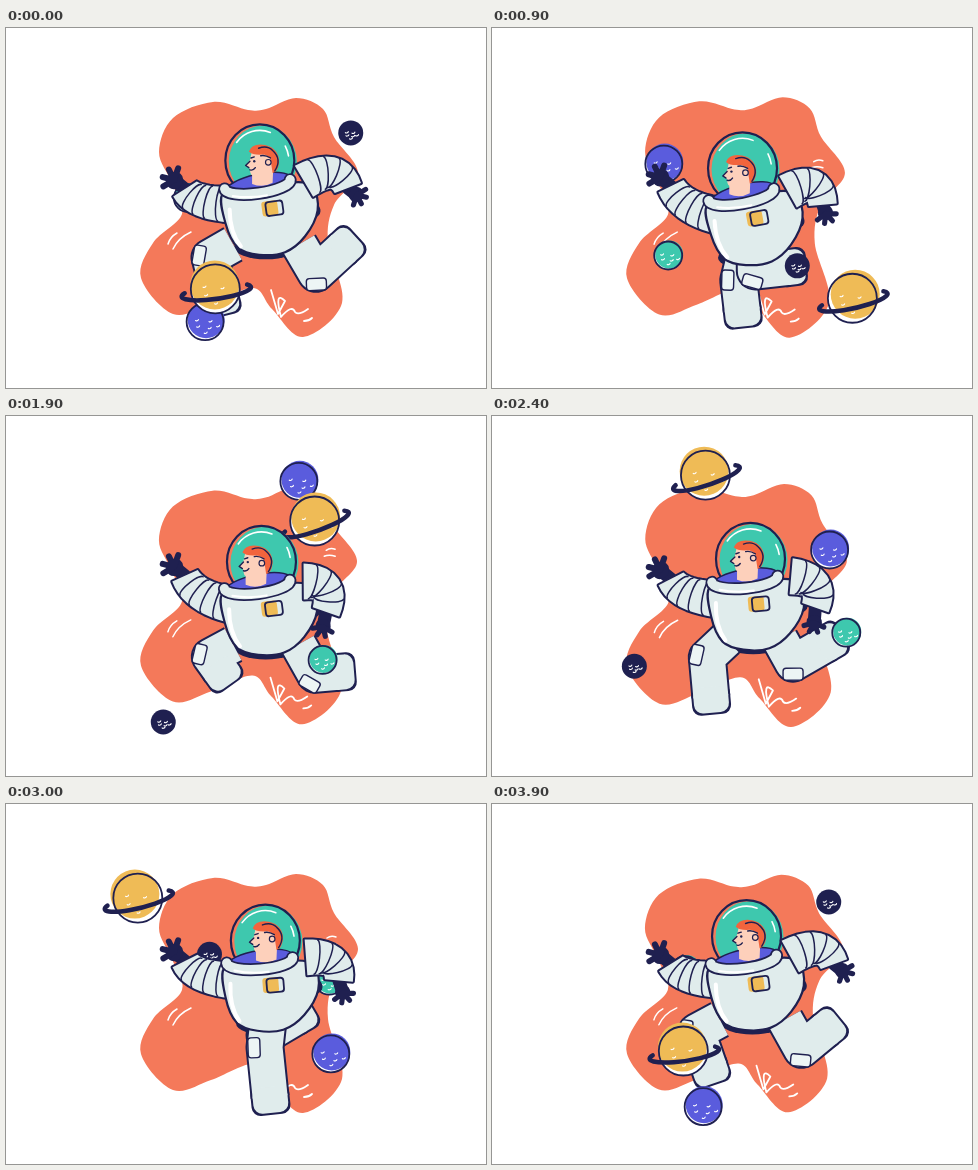
Write an HTML page with a canvas that moves like this. It is 480 px wide and 360 px high and loops after 4 s.

```html
<!DOCTYPE html>
<html>
<head>
<meta charset="utf-8">
<style>
html, body { margin: 0; width: 100%; height: 100%; overflow: hidden; background: #fff; }
canvas { display: block; }
</style>
</head>
<body>
<canvas id="stage" width="480" height="360"></canvas>
<script>
const ctx = document.getElementById('stage').getContext('2d');
const LOOP = 4000, STEP = 100, RAD = Math.PI / 180;
const NAVY = '#1f2050', SUIT = '#e0ecec', WHITE = '#fff', ORANGE = '#f4795a',
  TEAL = '#3ec8ae', BLUE = '#5a5cdd', YELLOW = '#efbb56', SKIN = '#fdd0bb', HAIR = '#f2643d';

let phase = 0; // degrees through the loop

// Every moving value swings around a middle and peaks at a given phase.
const wave = (mid, amp, peak) => mid + amp * Math.cos((phase - peak) * RAD);

// ---- drawing helpers ----

function paint(fill, stroke, width = 2) {
  if (fill) { ctx.fillStyle = fill; ctx.fill(); }
  if (stroke) { ctx.strokeStyle = stroke; ctx.lineWidth = width; ctx.stroke(); }
}

function oval(x, y, rx, ry, fill, stroke, width, tilt = 0, from = 0, to = 2 * Math.PI) {
  ctx.beginPath();
  ctx.ellipse(x, y, rx, ry, tilt, from, to);
  paint(fill, stroke, width);
}

const disc = (x, y, r, ...style) => oval(x, y, r, r, ...style);

function box(x, y, w, h, r, ...style) {
  ctx.beginPath();
  ctx.roundRect(x, y, w, h, r);
  paint(...style);
}

function line(d, color, width = 2) {
  ctx.strokeStyle = color;
  ctx.lineWidth = width;
  ctx.stroke(new Path2D(d));
}

function shape(d, color) {
  ctx.fillStyle = color;
  ctx.fill(new Path2D(d));
}

function local(x, y, turn, fn) {
  ctx.save();
  ctx.translate(x, y);
  ctx.rotate(turn);
  fn();
  ctx.restore();
}

// Closed curve through the given points
function smooth(pts) {
  const n = pts.length, at = i => pts[(i + n) % n];
  ctx.beginPath();
  ctx.moveTo(...pts[0]);
  for (let i = 0; i < n; i++) {
    const [a, b, c, d] = [at(i - 1), at(i), at(i + 1), at(i + 2)];
    ctx.bezierCurveTo(b[0] + (c[0] - a[0]) / 6, b[1] + (c[1] - a[1]) / 6,
      c[0] - (d[0] - b[0]) / 6, c[1] - (d[1] - b[1]) / 6, c[0], c[1]);
  }
}

// ---- planets ----

function craters(r) {
  for (let i = 0; i < 6; i++) {
    const a = i * 2.4 + .6, d = r * (.3 + .08 * i);
    oval(d * Math.cos(a), r * .2 + d * Math.sin(a) * .7, 1.6, 1, null, WHITE, 1.1, -.4, .3, 3);
  }
}

function planet(r, color, dx, dy) {
  disc(0, 0, r, WHITE);
  disc(dx, dy, r, color);
  disc(0, 0, r, null, NAVY, 1.8);
  craters(r);
}

function ringed() {
  planet(24.5, YELLOW, wave(0, 3, 100), -4);
  local(1, 3, wave(-.24, .1, 0), () =>
    oval(0, 0, 35, 7, null, NAVY, 4.5, 0, -.45, Math.PI + .45));
}

function moon() {
  disc(0, 0, 12.5, NAVY);
  craters(9);
}

// x and y each as [middle, amplitude, peak phase]
const planets = [
  { x: [252, 90, 234], y: [184, 128, -31], draw: () => planet(18.5, BLUE, 1, -2) },
  { x: [250, 125, 109], y: [176, 118, 44], draw: ringed },
  { x: [255, 100, 223], y: [205, 45, 141], draw: () => planet(14, TEAL, 1, -1) },
  { x: [247, 107, 24], y: [202, 110, 152], draw: moon }
];

// The upper part of each orbit passes behind the astronaut.
function drawPlanets(behind) {
  for (const { x, y, draw } of planets)
    if (wave(0, 1, y[2]) < -.35 === behind) local(wave(...x), wave(...y), 0, draw);
}

// ---- backdrop ----

const blob = [[290, 70], [260, 81], [242, 82], [207, 74], [167, 90], [153, 124], [166, 155], [176, 186],
  [147, 215], [135, 250], [167, 286], [205, 276], [247, 260], [266, 281], [297, 309], [336, 275],
  [322, 215], [328, 177], [352, 145], [328, 109], [317, 81]];

function drawBlob() {
  const swell = Math.sin(2 * phase * RAD);
  ctx.save();
  ctx.translate(135, 187);
  ctx.scale(1 + .014 * swell, 1 + .018 * swell);
  ctx.translate(-135, -187);
  smooth(blob);
  paint(ORANGE);
  line('M162 216Q164 209 171 205M167 221Q172 210 185 204M321 134Q325 131 330 133M319 140Q324 138 330 140', WHITE, 1.5);
  line('M265 262L272 286L279 273Q268 262 275 289Q286 276 289 284Q292 288 302 281M298 293Q303 293 306 290', WHITE, 1.8);
  ctx.restore();
}

// ---- astronaut ----

// Both legs share one stride, half a loop apart.
function drawLeg(x, y, shift, lift) {
  const stride = (mid, amp, peak) => wave(mid, amp, peak + shift);
  const hip = [x + stride(8, 33, 0), y + 56];
  const knee = [x + stride(5, 53, 0), y + stride(77, 10, -37)];
  const foot = [x + stride(28, 66, 15), y + stride(90, 40, 240) - lift * Math.cos(2 * phase * RAD)];
  const w = 35, turn = Math.atan2(foot[1] - knee[1], foot[0] - knee[0]);
  for (const [grow, color] of [[2, NAVY], [0, SUIT]]) {
    ctx.beginPath();
    ctx.moveTo(...hip);
    ctx.lineTo(...knee);
    ctx.lineTo(foot[0] - 8 * Math.cos(turn), foot[1] - 8 * Math.sin(turn));
    paint(null, color, w + 2 * grow);
    local(...foot, turn, () =>
      box(-18 - grow, -w / 2 - grow, 26 + 2 * grow, w + 2 * grow, 9, color));
  }
  const axis = Math.atan2(foot[1] - hip[1], foot[0] - hip[0]);
  local(knee[0] - 10 * Math.sin(axis), knee[1] + 10 * Math.cos(axis), axis, () =>
    box(-10, -5, 20, 12, 3, '#edf5f5', NAVY, 1.4));
}

function drawHand(x, y, turn, size) {
  local(x, y, turn, () => {
    oval(-1, 0, 8 * size, 9 * size, NAVY);
    ctx.beginPath();
    for (let a = -1.2; a < 1.3; a += .8) {
      ctx.moveTo(0, 0);
      ctx.lineTo(11.5 * size * Math.cos(a), 12.5 * size * Math.sin(a));
    }
    paint(null, NAVY, 6 * size);
  });
}

// Tapered, ribbed sleeve along a curve through the elbow
function drawArm(shoulder, elbow, cuff, hand, handSize) {
  const mid = elbow.map((e, i) => 2 * e - (shoulder[i] + cuff[i]) / 2);
  const at = u => {
    const v = 1 - u;
    const p = mid.map((m, i) => v * v * shoulder[i] + 2 * u * v * m + u * u * cuff[i]);
    const d = mid.map((m, i) => v * (m - shoulder[i]) + u * (cuff[i] - m));
    return { p, turn: Math.atan2(d[1], d[0]), half: 18 - 4 * u };
  };
  const edge = (u, side) => {
    const { p, turn, half } = at(u);
    return [p[0] - side * half * Math.sin(turn), p[1] + side * half * Math.cos(turn)];
  };
  ctx.beginPath();
  ctx.moveTo(...cuff);
  ctx.lineTo(...hand);
  paint(null, NAVY, 13);
  drawHand(...hand, Math.atan2(hand[1] - cuff[1], hand[0] - cuff[0]), handSize);

  ctx.beginPath();
  for (let i = 0; i <= 10; i++) ctx.lineTo(...edge(i / 10, 1));
  for (let i = 10; i >= 0; i--) ctx.lineTo(...edge(i / 10, -1));
  ctx.closePath();
  paint(null, NAVY, 4);
  paint(SUIT);
  for (let u = .2; u < .9; u += .2) {
    const { p, turn, half } = at(u);
    local(...p, turn, () => oval(-3, 0, 4, half, null, NAVY, 1.5, 0, -1.5, 1.5));
  }
}

function drawHead() {
  ctx.scale(1.08, 1.08);
  shape('M-8-13L-10-4L-14 1L-10 4Q-10 9-8 10L-8 18Q2 22 11 17L12-6Q6-16-8-13Z', SKIN);
  shape('M-11-12Q-8-20 4-18Q17-15 17-2Q16 7 11 8L9-5Q6-10-1-9Q-8-9-11-12Z', HAIR);
  line('M-2-15Q6-18 11-13Q20-5 13 6M9-6Q4-9 0-8M-10 5Q-7 6-5 3M-9-6L-6-7M-10-3L-14 1L-11 3', NAVY, 1.3);
  disc(-6, -3, 1.1, NAVY);
  disc(7, -2, 2.6, SKIN, NAVY, 1.1);
}

const torso = [[-35, 0], [-37, 30], [-28, 56], [-8, 66], [18, 67], [40, 54], [56, 30], [54, 6], [33, -1], [0, 6]];

function drawTorso() {
  smooth(torso);
  paint(SUIT, NAVY, 2.2);
  line('M-31 17Q-34 40-25 55', WHITE, 4);
  oval(0, -4, 33, 9, null, NAVY, 13, 0, 0, Math.PI);
  oval(0, -4, 33, 9, null, SUIT, 9.5, 0, 0, Math.PI);
  line('M-26 4Q-10 9 8 8', WHITE, 2);
  box(1, 14, 16, 15, 3, YELLOW);
  box(5, 15, 17, 14, 3, null, NAVY, 1.8);
}

function drawAstronaut() {
  const x = wave(252, 2, 270), y = wave(166, 8, 135), lean = wave(-.13, .05, 260);
  const hx = wave(255, 4.5, 255), hy = wave(139, 7, 160);
  oval(x + 50, y + 20, 13, 9, NAVY, null, 0, .4);
  oval(x + 8, y + 59, 32, 12, NAVY);
  ctx.lineCap = 'butt';
  drawLeg(x, y, 180, -8);
  drawLeg(x, y, 0, 16);
  ctx.lineCap = 'round';

  const hand = [168, 150 + 4 * Math.cos((2 * phase - 60) * RAD)];
  drawArm([x - 28, y + 16], [195, (hand[1] + y + 16) / 2 + 8], [hand[0] + 11, hand[1] + 9], hand, 1);

  oval(hx + 3, hy + 1, 34, 36, TEAL);
  oval(hx, hy, 34.5, 36, null, NAVY, 2.2);
  oval(hx, hy, 29, 30, null, WHITE, 1.6, 0, -2.5, -1.2);
  oval(hx, hy, 29, 30, null, WHITE, 1.6, 0, -.5, -.15);
  oval(x, y - 4, 33, 10, BLUE, NAVY, 1.5, lean - .08);
  local(hx + wave(-3, 4.5, -30), hy + wave(3.5, 3, 80), 0, drawHead);
  local(x, y, lean, drawTorso);

  drawArm([x + 46, y - 7],
    [wave(323, 4, 315), wave(159, 14, 175)],
    [wave(331, 11, -10), wave(178, 18, 175)],
    [wave(334, 17, -10), wave(189, 22, 180)], .85);
}

function render(now) {
  phase = Math.floor(now % LOOP / STEP) * STEP / LOOP * 360;
  ctx.fillStyle = WHITE;
  ctx.fillRect(0, 0, 480, 360);
  ctx.lineCap = ctx.lineJoin = 'round';
  drawBlob();
  drawPlanets(true);
  drawAstronaut();
  drawPlanets(false);
}

const start = performance.now();
function tick() {
  render(performance.now() - start);
  requestAnimationFrame(tick);
}
tick();
</script>
</body>
</html>
```
